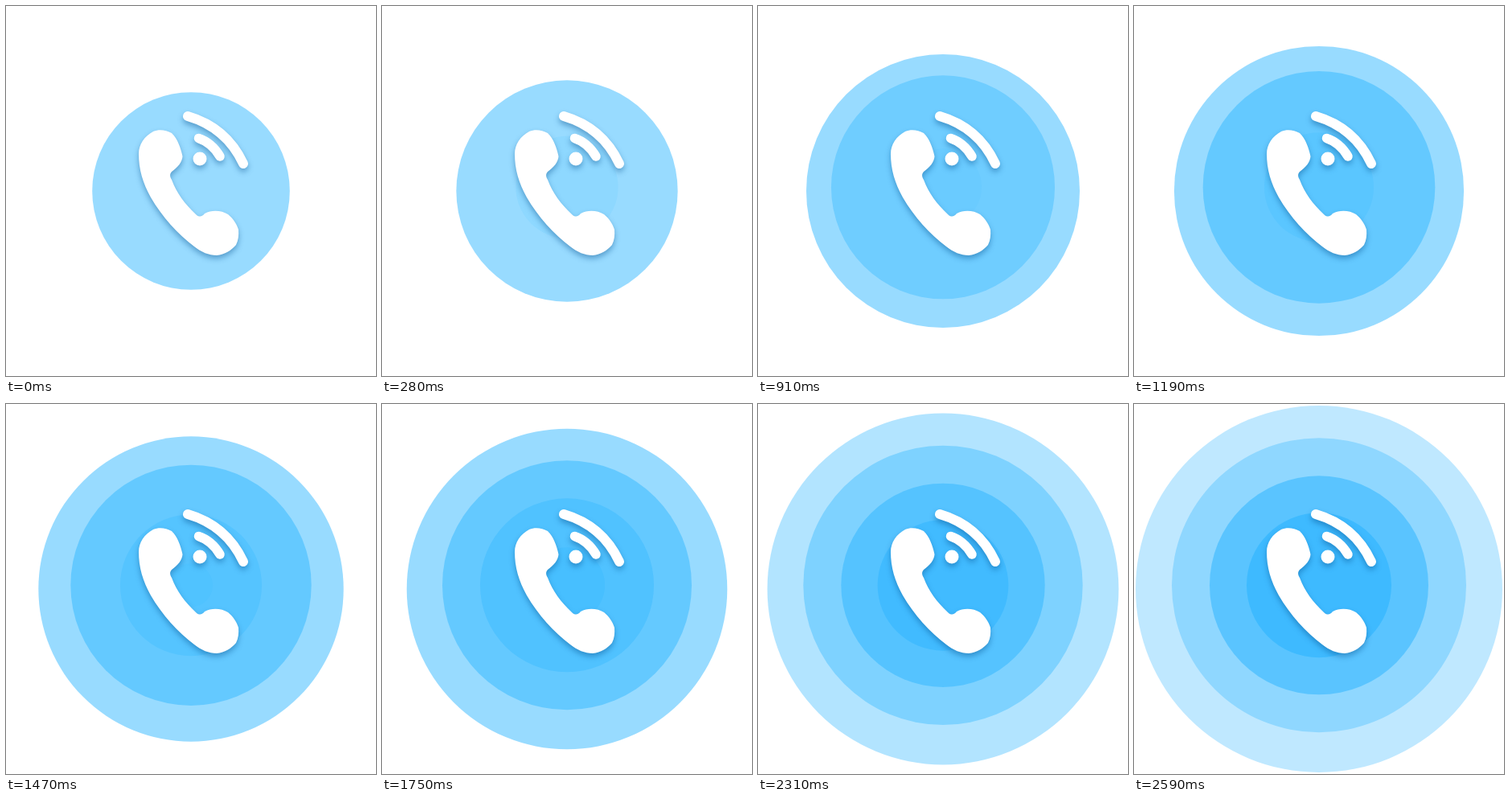
Write an HTML page that moves like this. It is 460 px wide and 460 px high and loops after 2660 ms.

```html
<!DOCTYPE html>
<html lang="en">
<head>
<meta charset="utf-8">
<title>Incoming call</title>
<style>
  html, body { margin: 0; width: 100%; height: 100%; overflow: hidden; background: #fff; }
  svg { display: block; width: 100%; height: 100%; }
  .phone { filter: drop-shadow(0 4px 3.5px rgba(0, 75, 135, .42)); }
</style>
</head>
<body>
<svg viewBox="0 0 460 460">
  <g id="rings" fill="#33b7ff"></g>
  <g class="phone" fill="#fff">
    <path d="M165 184C165 172 172 162 183 156C190 153 199 154 206 158C213 165 217 175 219.5 187C219 194 214 200 206 206C203 209 204 213 206 216C212 232 222 246 236 259C240 263 244 262 247 258C256 253 268 254 276 259C282 264 287 271 289 278C289.5 285 289 291 286 297C280 304 272 309 262 310C252 310 243 306 234 299C214 284 194 262 180 238C170 220 165 203 165 184Z"/>
    <circle cx="241" cy="190" r="8.5"/>
    <g fill="none" stroke="#fff" stroke-linecap="round">
      <path d="M239.5 164.5Q256 170 266 187" stroke-width="11.5"/>
      <path d="M226 137Q274 151 295 196" stroke-width="12"/>
    </g>
  </g>
</svg>
<script>
const STEP = 70, STEPS = 38;

// Keys are [step, value] pairs, joined by straight lines.
const rings = [
  { cy: 230,
    r: [[0, 122.8], [8, 152.5], [13, 170], [16, 177.7], [37, 228]],
    a: [[0, .5], [25, .5], [37, .314]] },
  { cy: 225.3,
    r: [[0, 30], [13, 139], [25, 155], [37, 183]],
    a: [[0, 0], [1, 0], [16, .5], [27, .5], [37, .343]] },
  { cy: 225.3,
    r: [[10, 33], [25, 108], [37, 136]],
    a: [[10, 0], [28, .5], [37, .57]] },
  { cy: 225.3,
    r: [[18, 12], [31, 77], [37, 90]],
    a: [[18, 0], [29, .48], [37, .7]] }
];

function at(keys, x) {
  if (x <= keys[0][0]) return keys[0][1];
  for (let i = 1; i < keys.length; i++) {
    const [x0, y0] = keys[i - 1], [x1, y1] = keys[i];
    if (x <= x1) return y0 + (y1 - y0) * (x - x0) / (x1 - x0);
  }
  return keys[keys.length - 1][1];
}

const group = document.getElementById('rings');
for (const ring of rings) {
  ring.el = document.createElementNS('http://www.w3.org/2000/svg', 'circle');
  ring.el.setAttribute('cx', 230);
  ring.el.setAttribute('cy', ring.cy);
  group.append(ring.el);
}

function draw(ms) {
  const step = Math.floor(ms / STEP) % STEPS;
  for (const { el, r, a } of rings) {
    el.setAttribute('r', at(r, step));
    el.setAttribute('fill-opacity', at(a, step));
  }
}

const start = performance.now();
function tick() {
  draw(performance.now() - start);
  requestAnimationFrame(tick);
}
tick();
</script>
</body>
</html>
```
